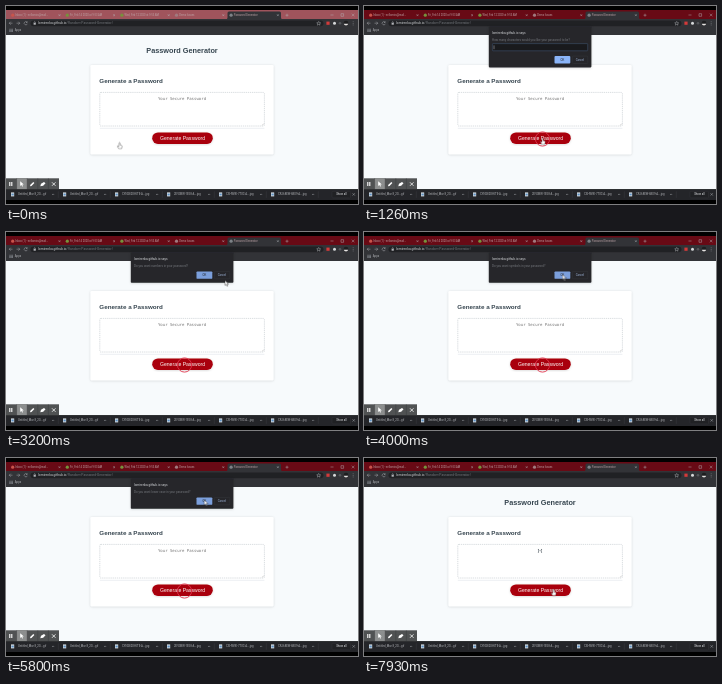
Recreate the animation shown at these times as an HTML page. Size 352x198 px, loop 8 s.

```html
<!DOCTYPE html>
<html lang="en">
<head>
<meta charset="utf-8">
<title>Password Generator</title>
<style>
html, body { margin: 0; width: 100%; height: 100%; overflow: hidden; background: #000; }
svg { display: block; width: 100vw; height: 100vh; }
text { font-family: Roboto, Arial, sans-serif; font-size: 2.8px; fill: #b4b6ba; }
.tab { font-size: 2.65px; fill: #bda3a6; }
.head { font-family: "Liberation Sans", Arial, sans-serif; font-weight: 700; fill: #36454f; }
.mono { font-family: "DejaVu Sans Mono", monospace; font-size: 4px; fill: #757575; }
.mid { text-anchor: middle; }
.line { fill: none; stroke: #b4b6ba; stroke-width: .45; }
.ring { fill: none; stroke: #e0354d; stroke-width: .9; }
.pointer { fill: #fff; stroke: #222; stroke-width: .4; stroke-linejoin: round; }

#strip, .timed { animation: 8s step-end infinite; }
.timed { opacity: 0; }
#strip { fill: #680a15; animation-name: focus; }
#ask0 { animation-name: ask0; }
#ask1 { animation-name: ask1; }
#ask2 { animation-name: ask2; }
#ask3 { animation-name: ask3; }
#ask4 { animation-name: ask4; }
#hint { animation-name: hint; }
#result { animation-name: result; }
#ring1 { animation-name: ring1; }
#ring2 { animation-name: ring2; animation-timing-function: linear; }
#hand { animation-name: hand; }
#arrow { animation-name: arrow; }
#typed { animation-name: typed; }
#mouse { animation: move 8s ease-in-out infinite; }
#caret { animation: blink 1s step-end infinite; }

@keyframes focus { 0% { fill: #a0545c; } 10.4%, 100% { fill: #680a15; } }
@keyframes ask0 { 0% { opacity: 0; } 11.6% { opacity: 1; } 34.4%, 100% { opacity: 0; } }
@keyframes ask1 { 0% { opacity: 0; } 34.4% { opacity: 1; } 48.2%, 100% { opacity: 0; } }
@keyframes ask2 { 0% { opacity: 0; } 48.2% { opacity: 1; } 58.6%, 100% { opacity: 0; } }
@keyframes ask3 { 0% { opacity: 0; } 58.6% { opacity: 1; } 70%, 100% { opacity: 0; } }
@keyframes ask4 { 0% { opacity: 0; } 70% { opacity: 1; } 81.2%, 100% { opacity: 0; } }
@keyframes hint { 0% { opacity: 1; } 81.2%, 100% { opacity: 0; } }
@keyframes result { 0% { opacity: 0; } 81.2%, 100% { opacity: 1; } }
@keyframes ring1 { 0% { opacity: 0; } 10.4% { opacity: 1; } 81.2%, 100% { opacity: 0; } }
@keyframes ring2 { 0%, 81.19% { opacity: 0; } 81.2% { opacity: 1; } 87%, 100% { opacity: 0; } }
@keyframes hand { 0% { opacity: 1; } 26.6% { opacity: 0; } 95%, 100% { opacity: 1; } }
@keyframes arrow { 0% { opacity: 0; } 35% { opacity: 1; } 95%, 100% { opacity: 0; } }
@keyframes typed { 0% { opacity: 0; } 31.5%, 100% { opacity: 1; } }
@keyframes blink { 0% { opacity: 1; } 70% { opacity: 0; } }
@keyframes move {
  0%, 1% { transform: translate(113.5px, 136.5px); }
  9%, 34.9% { transform: translate(178.6px, 132.2px); }
  39.5%, 40.5% { transform: translate(219px, 48.5px); }
  45%, 58% { transform: translate(198.5px, 42.5px); }
  60%, 70% { transform: translate(198px, 42px); }
  76%, 83.5% { transform: translate(199px, 42px); }
  97%, 100% { transform: translate(189.4px, 131.4px); }
}
</style>
</head>
<body>
<svg viewBox="0 0 352 198" preserveAspectRatio="none">
  <defs>
    <filter id="shadow" x="-10%" y="-10%" width="120%" height="125%">
      <feDropShadow dx="0" dy=".5" stdDeviation=".9" flood-opacity=".17"/>
    </filter>
  </defs>
  <rect width="352" height="198"/>

  <!-- browser window -->
  <rect id="strip" y="4" width="352" height="9.5"/>
  <path d="M220 13.5Q221.5 13 221.5 11.5V7Q221.5 5.5 223 5.5H273.5Q275 5.5 275 7V11.5Q275 13 276.5 13.5Z" fill="#323337"/>
  <g id="tabs"></g>
  <path class="line" d="M279.5 9.2H282.5M281 7.7V10.7M324.5 9H327.5M335 7.7H337.6V10.3H335ZM345.8 7.7L348.4 10.3M348.4 7.7L345.8 10.3"/>
  <rect y="13" width="352" height="16" fill="#323337"/>
  <rect x="24.5" y="14.4" width="293" height="5.8" rx="2.9" fill="#202124"/>
  <path class="line" d="M6.5 17.2H3.2L4.7 15.7M3.2 17.2L4.7 18.7M10.5 17.2H13.8L12.3 15.7M13.8 17.2L12.3 18.7M21 16.2A1.6 1.6 0 1 0 21.3 17.8M21.2 15.3V16.5H20"/>
  <rect x="27.6" y="16.8" width="2.2" height="1.9" fill="#b4b6ba"/>
  <path class="line" d="M28 16.8V16Q28.7 15 29.4 16V16.8"/>
  <text x="32" y="18.3" style="font-size:3.35px;fill:#d3d5d8">lomirenka.github.io<tspan fill="#74787d">/Random-Password-Generator/</tspan></text>
  <path d="M312.7 15.4L313.3 16.7 314.7 16.9 313.6 17.8 314 19.2 312.7 18.4 311.4 19.2 311.8 17.8 310.7 16.9 312.1 16.7Z" class="line"/>
  <rect x="320.4" y="15.6" width="3.2" height="3.2" fill="#d43a3a"/>
  <circle cx="328.5" cy="17.2" r="1.5" fill="#d6d8da"/>
  <circle cx="334" cy="17.2" r="1.3" fill="#55575b"/>
  <circle cx="340" cy="17.2" r="2.4" fill="#1d1d1f"/>
  <path d="M337.7 17.8A2.4 2.4 0 0 0 342.3 17.8Z" fill="#e4e2e0"/>
  <path d="M347.2 15.4v.8m0 .8v.8m0 .8v.8" class="line"/>
  <g fill="#a0a6ad" id="apps"></g>
  <text x="8.8" y="25.4">Apps</text>

  <!-- page -->
  <rect y="29" width="352" height="154.3" fill="#f7fafc"/>
  <text class="head mid" x="176" y="47.2" style="font-size:7.3px">Password Generator</text>
  <rect x="84.5" y="59" width="183" height="89.3" rx="1.2" fill="#fff" filter="url(#shadow)"/>
  <text class="head" x="93.3" y="76.6" style="font-size:6.25px">Generate a Password</text>
  <rect x="93.8" y="86.4" width="164.6" height="33.6" rx="1" fill="#fff" stroke="#b3bac0" stroke-width=".5" stroke-dasharray="1.3 .8"/>
  <path d="M256 119.3L257.7 117.6M257 119.3L257.7 118.6" stroke="#888" stroke-width=".3"/>
  <path d="M93.8 122.3H258.4" stroke="#d9dfe4" stroke-width=".5"/>
  <text id="hint" class="mono mid timed" x="176" y="94.2">Your Secure Password</text>
  <text id="result" class="mono mid timed" x="176" y="94.1" style="fill:#2f3b44;font-weight:700">}{</text>
  <rect x="146.2" y="126.4" width="60.6" height="11.5" rx="5.75" fill="#a9050d" filter="url(#shadow)"/>
  <text class="mid" x="176.5" y="133.9" style="font:5.1px 'Liberation Sans',Arial,sans-serif;fill:#fff">Generate Password</text>
  <circle id="ring1" class="ring timed" cx="178.5" cy="133" r="7.1"/>

  <!-- recorder tools -->
  <rect y="172.3" width="53" height="11" fill="#505253"/>
  <rect x="10.6" y="172.3" width="10.6" height="11" fill="#8c8e8e"/>
  <path d="M10.6 172.3v11m10.6 -11v11m10.6 -11v11m10.6 -11v11" stroke="#37393a" stroke-width=".4"/>
  <path d="M3.8 176V180M5.8 176V180" stroke="#fff" stroke-width="1.1"/>
  <path d="M14.2 175.2V180L15.4 178.9 16.2 180.6 17 180.2 16.2 178.6H17.8Z" fill="#fff"/>
  <path d="M24 180.2L24.4 178.8 27.3 175.9 28.4 177 25.5 179.9Z" fill="#fff"/>
  <path d="M34.3 180.3L35 177.7 38 175.9 39.5 177.2 37.2 179.7Z" fill="#fff"/>
  <path d="M46 176.3L49.5 179.8M49.5 176.3L46 179.8" stroke="#fff" stroke-width=".8"/>

  <!-- download bar -->
  <rect y="183.3" width="352" height="10.7" fill="#242529"/>
  <g id="files"></g>
  <rect x="326" y="185.3" width="18.5" height="6.6" rx=".8" fill="#202124" stroke="#404247" stroke-width=".3"/>
  <text class="mid" x="335.4" y="189.4" style="fill:#e8eaed">Show all</text>
  <path class="line" d="M346.5 187.2L348.9 189.6M348.9 187.2L346.5 189.6"/>

  <g id="dialogs"></g>
  <circle id="ring2" class="ring timed" cx="199.6" cy="43.7" r="6.2"/>
  <g id="mouse">
    <g transform="scale(.85)">
      <path id="hand" class="pointer timed" d="M-.7 .5Q0 -.5 .7 .5V2.9L2.7 3.5Q3.3 3.9 3.1 5L2.5 7.2H-1L-2.8 4.4Q-2.3 3.5 -.7 4.6Z"/>
    </g>
    <path id="arrow" class="pointer timed" d="M0 0V5L1.2 3.9 2 5.7 2.8 5.3 2 3.6H3.6Z"/>
  </g>
</svg>
<script>
const fill = (id, parts) => document.getElementById(id).innerHTML = parts.join("");

const tabs = [
  ["Inbox (1) - nellomira@mail…", "#c9544c"],
  ["Fri, Feb 14 2020 at 9:53 AM", "#76923c"],
  ["Wed, Feb 12 2020 at 9:53 AM", "#76923c"],
  ["Demo Issues", "#a07a7f"],
  ["Password Generator", "#7d8287"]
];
fill("tabs", tabs.map(([name, color], i) => {
  const x = 3 + i * 54.6;
  return `<circle cx="${x + 3.7}" cy="9.2" r="1.6" fill="${color}"/>
    <text class="tab" x="${x + 6.4}" y="10.1">${name}</text>
    <path class="line" d="M${x + 49.6} 8.3l1.8 1.8m0 -1.8l-1.8 1.8"/>`;
}));

fill("apps", Array.from({ length: 9 }, (_, i) =>
  `<rect x="${3.5 + i % 3 * 1.2}" y="${22.8 + Math.floor(i / 3) * 1.2}" width=".8" height=".8"/>`));

const files = ["Untitled_Mar 8_20….gif", "Untitled_Mar 8_20….gif", "CYN2820-KITE-A….jpg",
  "2EV0BW-1E58-A….jpg", "CSHW9E-7T0C-A….jpg", "CRJ68EW-6B09-A….jpg"];
fill("files", files.map((name, i) => {
  const x = i * 52;
  return `<rect x="${x + 5}" y="186.4" width="3.2" height="4" fill="#d3d9de"/>
    <rect x="${x + 5.5}" y="187.6" width="2.2" height="1.8" fill="#5b8fc4"/>
    <text x="${x + 12}" y="189.4">${name}</text>
    <path class="line" d="M${x + 46} 189l1.1 -1.1l1.1 1.1"/>
    <path d="M${x + 52.3} 185.3v6.6" stroke="#404247" stroke-width=".4"/>`;
}));

const field = `<rect x="128.4" y="37.6" width="95.3" height="7.2" rx=".6" fill="#191a1d" stroke="#445a78" stroke-width=".5"/>
  <text id="typed" class="timed" x="129.8" y="42.3">2</text>
  <path id="caret" d="M130 39.4V43.2" stroke="#e8eaed" stroke-width=".4"/>`;
const asks = [
  "How many characters would you like your password to be?",
  "Do you want numbers in your password?",
  "Do you want symbols in your password?",
  "Do you want upper case in your password?",
  "Do you want lower case in your password?"
];
fill("dialogs", asks.map((ask, i) => {
  const y = i ? 39.4 : 50.1;
  return `<g id="ask${i}" class="timed">
    <rect x="124.8" y="20.5" width="102.6" height="${y - 9.2}" rx=".8" fill="#252629" filter="url(#shadow)"/>
    <text x="128" y="28.1" style="font-size:3.1px;fill:#d9dbde">lomirenka.github.io says</text>
    <text x="128" y="34.6" style="font-size:3px;fill:#74777c">${ask}</text>
    ${i ? "" : field}
    <rect x="190.5" y="${y}" width="15.8" height="7.4" rx=".9" fill="${i ? "#7b9fdc" : "#8ab4f8"}"/>
    <text class="mid" x="198.4" y="${y + 4.7}" style="fill:#202124">OK</text>
    <rect x="208.4" y="${y}" width="15.4" height="7.4" rx=".9" fill="none" stroke="#393b3f" stroke-width=".4"/>
    <text class="mid" x="216" y="${y + 4.7}" style="fill:#9db3d8">Cancel</text>
  </g>`;
}));
</script>
</body>
</html>
```
